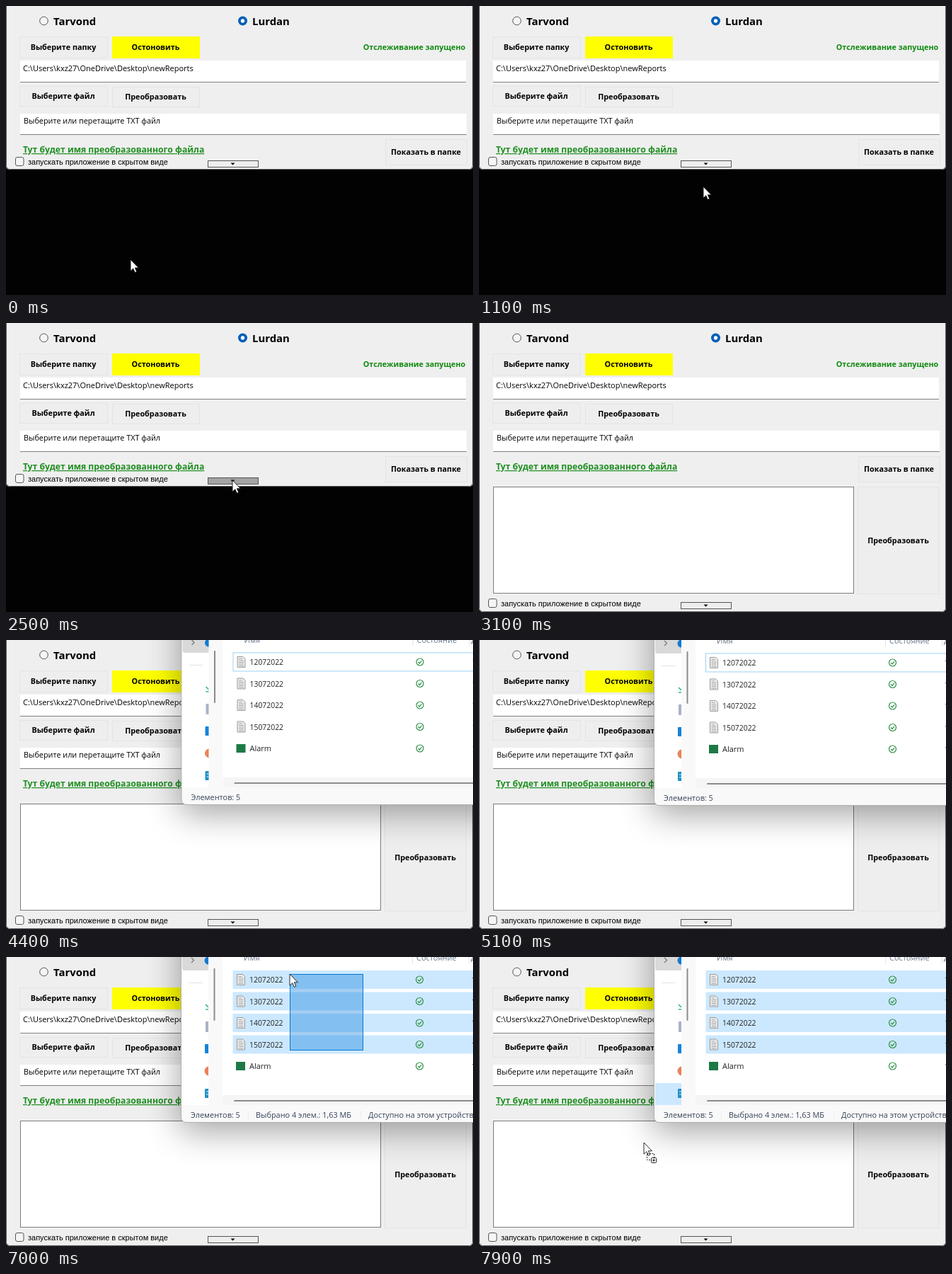
Animation, 660 px wide and 408 px high, one loop 8 s. Source, as an HTML page:

```html
<!DOCTYPE html>
<html lang="ru">
<head>
<meta charset="utf-8">
<style>
html, body { margin: 0; width: 100%; height: 100%; overflow: hidden; background: #020202; }
svg { display: block; width: 660px; height: 408px; }
text { font-family: "Open Sans", "Noto Sans", sans-serif; font-size: 11px; white-space: pre; }
.b { font-weight: 700; font-size: 10.8px; text-anchor: middle; }
.title { font-weight: 700; font-size: 14.9px; }
.btn { fill: #eeeeee; stroke: #e4e4e4; }
.link { font-weight: 700; font-size: 12.2px; fill: #1f8f22; text-decoration: underline 1px; text-underline-offset: 2px; }
#rows text { fill: #222; }
#rows .num { font-size: 10.4px; }
#status text { fill: #36435a; font-size: 10.9px; }
.head { fill: #66788c; }
</style>
</head>
<body>
<svg viewBox="0 0 660 408">
  <defs>
    <clipPath id="formClip"><rect id="formClipBox" x="0" y="-20" width="660" height="251" rx="5"/></clipPath>
    <clipPath id="sideClip"><rect x="248" y="-20" width="38" height="229"/></clipPath>
    <filter id="blur" x="-30%" y="-60%" width="160%" height="220%"><feGaussianBlur stdDeviation="24"/></filter>
  </defs>
  <rect width="660" height="408" fill="#020202"/>

  <g clip-path="url(#formClip)">
    <rect width="660" height="408" fill="#efefef"/>
    <circle cx="53.5" cy="21" r="5.8" fill="#f5f5f5" stroke="#555"/>
    <text class="title" x="67" y="26.5">Tarvond</text>
    <circle cx="334.5" cy="21" r="6.5" fill="#005fb8"/>
    <circle cx="334.5" cy="21" r="2.7" fill="#fff"/>
    <text class="title" x="348" y="26.5">Lurdan</text>

    <g id="buttons"></g>
    <text class="b" x="577" y="62" fill="#108a10">Отслеживание запущено</text>

    <rect x="20" y="77" width="630" height="30.5" fill="#fff"/>
    <text x="24" y="92">C:\Users\kxz27\OneDrive\Desktop\newReports</text>
    <rect x="20" y="152" width="631" height="29.5" fill="#fff"/>
    <path d="M20 107.5H650M20 181.5H651" stroke="#808080"/>
    <text x="25" y="166" style="font-size:10.85px">Выберите или перетащите TXT файл</text>
    <text class="link" x="24" y="207">Тут будет имя преобразованного файла</text>

    <rect x="20.5" y="231.5" width="509" height="150" fill="#fff" stroke="#7c7c7c"/>

    <g id="foot">
      <rect x="12" y="212" width="220" height="16" fill="#efefef"/>
      <rect x="13.5" y="213.5" width="11.5" height="12" rx="2.5" fill="#f6f6f6" stroke="#555"/>
      <text x="31" y="223.5" style="font-family:'Liberation Sans',Arial,sans-serif">запускать приложение в скрытом виде</text>
      <rect id="toggle" x="285.5" y="218.5" width="71" height="9" stroke="#555"/>
      <path d="M317.5 221.5h6l-3 3z" fill="#000"/>
    </g>
  </g>
  <rect id="edge" x=".5" y="-20" width="659" height="250.5" rx="5" fill="none" stroke="#5a5a5a"/>

  <g id="explorer">
    <rect x="246" y="-200" width="900" height="446" fill="#000" opacity=".36" filter="url(#blur)"/>
    <rect x="247.5" y="-200" width="900" height="433.5" rx="7" fill="#f9f9f9" stroke="#b0b0b0"/>
    <rect x="306" y="-20" width="800" height="229" fill="#fff"/>
    <rect x="306" y="195" width="800" height="14" fill="#f5f5f5"/>
    <g clip-path="url(#sideClip)">
      <rect x="248" y="-20" width="40" height="230" fill="#fff"/>
      <rect x="249" y="-10" width="50" height="29" rx="3" fill="#d9d9d9"/>
      <path d="M262 1l3.5 3.5-3.5 3.5" fill="none" stroke="#777" stroke-width="1.2"/>
      <circle cx="286" cy="5" r="5.5" fill="#1479d0"/>
      <path d="M258 36.5H278" stroke="#e2e2e2"/>
      <rect id="drop" x="249" y="178" width="40" height="31" fill="#cce8ff"/>
      <path d="M282 67l4 4M282 74h5" stroke="#35b597" stroke-width="1.6"/>
      <rect x="282" y="91" width="12" height="15" rx="1" fill="#a9b3c4"/>
      <rect x="281" y="123" width="14" height="13" rx="1" fill="#1683d8"/>
      <circle cx="287" cy="161" r="6.5" fill="#e8835a"/>
      <rect x="281" y="186" width="14" height="13" rx="1" fill="#2191c4"/>
      <path d="M283 190h3M283 194h3" stroke="#d8f1ff"/>
    </g>
    <path d="M294.5 17V89" stroke="#8b8b8b" stroke-width="2" stroke-linecap="round"/>
    <path d="M323 203H1000" stroke="#8b8b8b" stroke-width="2" stroke-linecap="round"/>
    <path d="M574.5 -10V9M654.5 -10V9" stroke="#e3e3e3"/>
    <text class="head" x="336" y="5">Имя</text>
    <text class="head" x="580" y="5">Состояние</text>
    <text class="head" x="657" y="5">Дата</text>
    <g id="rows"></g>
    <rect id="marquee" fill="#0078d7" fill-opacity=".36" stroke="#0078d7"/>
    <g id="status">
      <text x="261" y="226.5">Элементов: 5</text>
      <g id="picked">
        <path d="M342.5 217v12M501.5 217v12" stroke="#ececec"/>
        <text id="count" x="353" y="226.5"></text>
        <text x="512" y="226.5">Доступно на этом устройстве</text>
      </g>
    </g>
  </g>

  <g id="cursor">
    <path d="M0 0V16.2L3.8 12.7L6.3 18.3L8.8 17.2L6.4 11.8H11.4Z" fill="#fff" stroke="#111" stroke-width=".9"/>
    <g id="plus" fill="none" stroke="#222">
      <rect x="4.5" y="15.5" width="10" height="9" stroke-dasharray="2 1.5"/>
      <rect x="10.5" y="21.5" width="7" height="7" rx="1" fill="#fff"/>
      <path d="M14 23v4M12 25h4"/>
    </g>
  </g>
</svg>
<script>
const LOOP = 8000, STEP = 100;
const $ = id => document.getElementById(id);
const set = (el, attrs) => { for (const k in attrs) el.setAttribute(k, attrs[k]); };
const show = (el, on) => set(el, { visibility: on ? 'visible' : 'hidden' });
const move = (el, x, y) => set(el, { transform: `translate(${x} ${y})` });

// x, y, width, height, label, colour
const buttons = [
  [19, 43, 124, 30, 'Выберите папку'],
  [150, 43, 123, 30, 'Остоновить', '#ffff00'],
  [19, 113, 124, 28, 'Выберите файл'],
  [150, 114, 123, 28, 'Преобразовать'],
  [536, 188, 115, 36, 'Показать в папке'],
  [535, 231, 115, 151, 'Преобразовать']
];
$('buttons').innerHTML = buttons.map(([x, y, w, h, label, color]) =>
  `<rect class="btn" x="${x + .5}" y="${y + .5}" width="${w}" height="${h}"${color ? ` style="fill:${color};stroke:${color}"` : ''}/>
   <text class="b" x="${x + w / 2}" y="${y + h / 2 + 4}">${label}</text>`).join('');

const files = ['12072022', '13072022', '14072022', '15072022', 'Alarm'];
const rowY = i => 32 + i * 30.5;
const page = y => `<path d="M326.5 ${y - 7.5}h8l3 3v12h-11z" fill="#ececec" stroke="#9a9a9a"/>
  <path d="M328.5 ${y - 4.5}h5m-5 2.5h7m-7 2.5h7m-7 2.5h7m-7 2.5h7" stroke="#a8a8a8"/>`;
const sheet = y => `<rect x="325" y="${y - 6}" width="13" height="12" fill="#1d7a45"/>`;
$('rows').innerHTML = files.map((name, i) => {
  const y = rowY(i), last = i === 4;
  return `<rect class="back" x="320.5" y="${y - 13}" width="700" height="26"/>${last ? sheet(y) : page(y)}
    <text${last ? '' : ' class="num"'} x="344" y="${y + 4}">${name}</text>
    <circle cx="584.5" cy="${y}" r="5" fill="none" stroke="#2f9147" stroke-width="1.2"/>
    <path d="M582 ${y}l2 2 3-3.6" fill="none" stroke="#2f9147" stroke-width="1.2"/>
    <text x="658" y="${y + 4}">18.07.2022</text>`;
}).join('');
const backs = document.querySelectorAll('.back');

// Keys are [time, ...values]; eased or linear between them
function along(keys, t, ease = true) {
  let i = 0;
  while (i < keys.length - 1 && keys[i + 1][0] <= t) i++;
  const a = keys[i], b = keys[i + 1];
  if (!b || t <= a[0]) return a.slice(1);
  let u = (t - a[0]) / (b[0] - a[0]);
  if (ease) u = u * u * (3 - 2 * u);
  return a.slice(1).map((v, k) => v + (b[k + 1] - v) * u);
}

const pointer = [
  [0, 176, 358], [100, 176, 358], [900, 317, 255], [1100, 317, 255], [1800, 320, 222],
  [2700, 320, 222], [3050, 330, 430], [5199, 330, 430], [5200, 570, -30], [5800, 505, 131],
  [6200, 505, 131], [7000, 401, 24], [7100, 401, 24], [7300, 398, 36], [7400, 398, 36]
];
const carry = [[7400, 398, 36], [7700, 268, 186], [7900, 233, 262]];
const growth = [[2500, 0], [2700, 166], [2800, 177]];
const entry = [[4200, 70, -90], [4300, 14, -16], [4400, .5, -1], [4500, 0, 0]];
const start = [505, 132];

function draw(t) {
  const [px, py] = t < 7400 ? along(pointer, t) : along(carry, t, false);
  move($('cursor'), px, py);
  show($('plus'), t >= 7500);

  const [grow] = along(growth, t, false);
  set($('formClipBox'), { height: 251 + grow });
  set($('edge'), { height: 250.5 + grow });
  move($('foot'), 0, Math.min(grow, 176));
  const over = grow === 0 && px >= 285 && px <= 356 && py >= 217 && py <= 228;
  set($('toggle'), { fill: over ? '#a3a3a3' : '#eeeeee' });

  const open = t >= 4200;
  set($('explorer'), { display: open ? 'inline' : 'none' });
  if (!open) return;
  move($('explorer'), ...along(entry, t, false));

  const dragging = t > 6200 && t < 7200;
  set($('marquee'), {
    display: dragging ? 'inline' : 'none',
    x: px + .5, y: py + .5,
    width: Math.max(0, start[0] - px - 1), height: Math.max(0, start[1] - py - 1)
  });

  const top = t >= 7200 ? 24 : py;
  let picked = 0;
  backs.forEach((el, i) => {
    const y = rowY(i);
    const on = t > 6200 && i < 4 && top <= y + 13;
    const hover = px >= 320 && Math.abs(py - y) < 13;
    picked += on;
    set(el, {
      fill: on ? '#cce8ff' : hover ? '#e5f3ff' : i ? 'none' : '#fff',
      stroke: i === 0 && !on ? '#99d1f5' : 'none'
    });
  });
  show($('picked'), picked > 0);
  const size = picked > 1 ? (picked * .4075).toFixed(2).replace('.', ',') + ' МБ' : '417 КБ';
  $('count').textContent = `Выбрано ${picked} элем.: ${size}`;
  show($('drop'), t >= 7700);
}

const t0 = performance.now();
function tick() {
  const t = (performance.now() - t0) % LOOP;
  draw(Math.floor(t / STEP) * STEP);
  requestAnimationFrame(tick);
}
tick();
</script>
</body>
</html>
```
